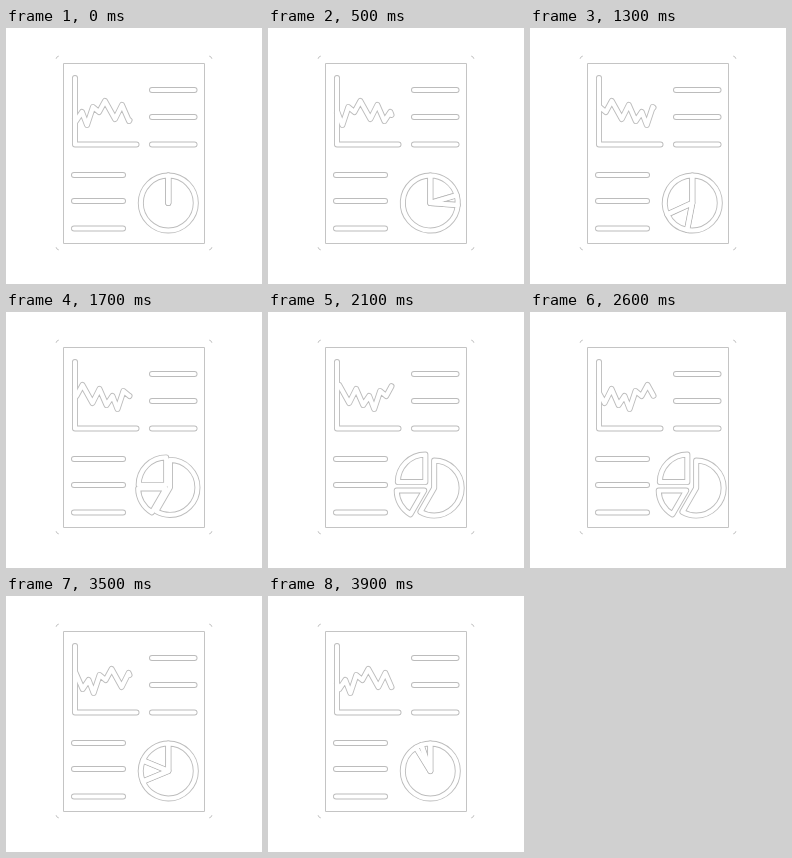
An HTML page with a canvas that plays this animation: 256 px wide and 256 px high, repeating every 4000 ms.

```html
<!DOCTYPE html>
<html lang="en">
<head>
<meta charset="utf-8">
<title>Report</title>
<style>
  html, body { margin: 0; width: 100%; height: 100%; overflow: hidden; background: #fff; }
  canvas { display: block; width: 256px; height: 256px; }
</style>
</head>
<body>
<canvas id="stage" width="256" height="256"></canvas>
<script>
const ctx = document.getElementById('stage').getContext('2d');
const LOOP = 4000, STEP = 100;
const EDGE = '#bcbcbc', FRAME = '#c4c4c4';
const TAU = Math.PI * 2;

// One period of the chart; it repeats every PERIOD pixels.
const PERIOD = 53, CHART_LEFT = 69, CHART_RIGHT = 123.5;
const WAVE = [[70, 93], [76, 84], [81, 97], [87, 79], [93, 84], [99, 73], [109, 91], [116, 77]];
const PIE = { x: 162.3, y: 175, r: 27.5 };

const ramp = (t, from, to) => Math.min(1, Math.max(0, (t - from) / (to - from)));
const mix = (a, b, p) => a + (b - a) * p;

function polyline(points) {
  const path = new Path2D();
  points.forEach(([x, y]) => path.lineTo(x, y));
  return path;
}

function chart(t) {
  const shift = PERIOD * t / LOOP;
  const all = [];
  for (let k = -1; k < 4; k++) {
    for (const [x, y] of WAVE) all.push([x + k * PERIOD - shift, y]);
  }
  const cut = (a, b, x) => [x, mix(a[1], b[1], (x - a[0]) / (b[0] - a[0]))];
  const visible = [];
  for (let i = 1; i < all.length; i++) {
    const a = all[i - 1], b = all[i];
    if (b[0] <= CHART_LEFT || a[0] >= CHART_RIGHT) continue;
    if (!visible.length) visible.push(cut(a, b, CHART_LEFT));
    visible.push(b[0] > CHART_RIGHT ? cut(a, b, CHART_RIGHT) : b);
  }
  return polyline(visible);
}

// Angles are in degrees, clockwise from the top.
function sector(from, to, heading, distance) {
  const turn = deg => (deg - 90) * TAU / 360;
  const x = PIE.x + distance * Math.cos(turn(heading));
  const y = PIE.y + distance * Math.sin(turn(heading));
  const path = new Path2D();
  path.moveTo(x, y);
  path.arc(x, y, PIE.r, turn(from), turn(to));
  path.closePath();
  return path;
}

function pie(t) {
  const open = ramp(t, 0, 1430), close = ramp(t, 3315, 4055);
  const spread = ramp(t, 1430, 2060) - ramp(t, 2670, 3310);
  const first = mix(210 * open, 360, close);
  const second = mix(270 * open, 360, close);
  return [
    sector(0, first, 105, 4 * spread),
    sector(first, second, 240, 7 * spread),
    sector(second, 360, 315, 7 * spread)
  ];
}

const fixed = [
  polyline([[69, 50], [69, 116.5], [130.5, 116.5]]),
  ...[62, 89, 116.5].map(y => polyline([[146, y], [188.5, y]])),
  ...[147, 173, 200.5].map(y => polyline([[68, y], [117, y]]))
];

function drawPage() {
  ctx.fillStyle = '#fff';
  ctx.fillRect(0, 0, 256, 256);
  ctx.lineWidth = 1;
  ctx.strokeStyle = FRAME;
  ctx.strokeRect(57.5, 35.5, 141, 180);
  [[53.5, 31.5, 2], [202.5, 31.5, 3], [202.5, 218.5, 0], [53.5, 218.5, 1]].forEach(([x, y, quarter]) => {
    ctx.beginPath();
    ctx.arc(x, y, 3.5, quarter * TAU / 4 + 0.2, (quarter + 1) * TAU / 4 - 0.2);
    ctx.stroke();
  });
}

function draw(t) {
  drawPage();
  const shapes = [...fixed, chart(t), ...pie(t)];
  ctx.lineCap = ctx.lineJoin = 'round';
  // Edges first, then white bodies, so that overlaps merge.
  for (const [color, width] of [[EDGE, 6], ['#fff', 4.2]]) {
    ctx.strokeStyle = color;
    ctx.lineWidth = width;
    shapes.forEach(path => ctx.stroke(path));
  }
  ctx.lineCap = 'butt';
}

const start = performance.now();
function tick() {
  const t = (performance.now() - start) % LOOP;
  draw(Math.floor(t / STEP) * STEP);
  requestAnimationFrame(tick);
}
tick();
</script>
</body>
</html>
```
